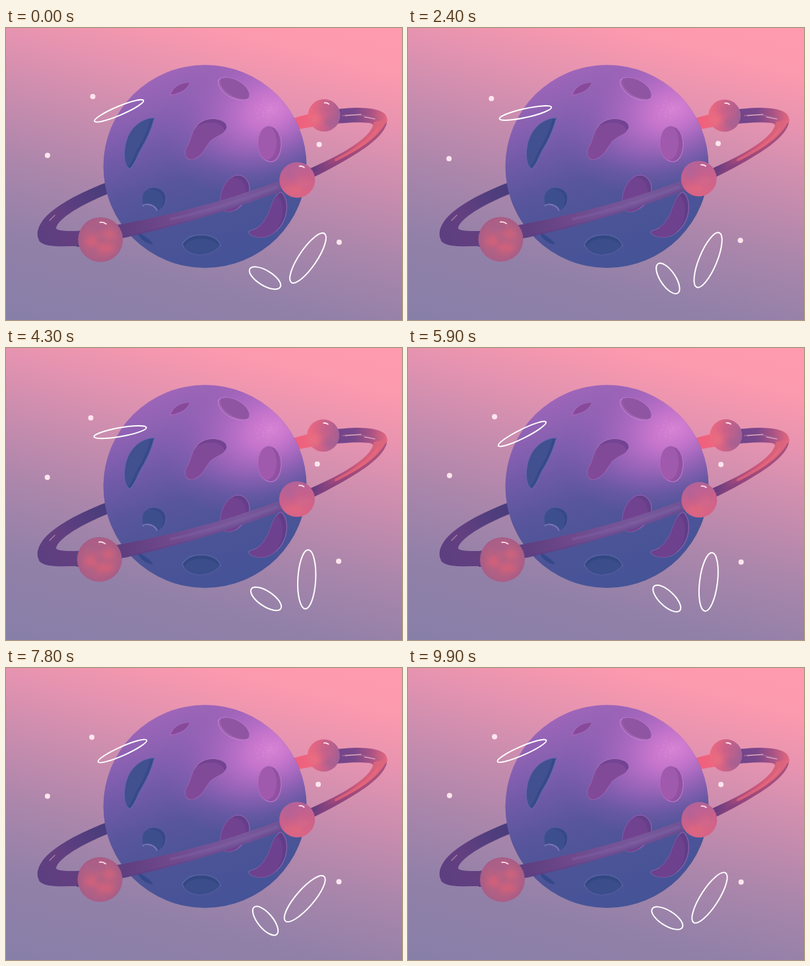
An HTML page that plays this animation: 600 by 443 pixels, repeating every 10 s.

```html
<!DOCTYPE html>
<html lang="en">
<head>
<meta charset="utf-8">
<title>Ringed planet</title>
<style>
  html, body { margin: 0; width: 100%; height: 100%; overflow: hidden; background: #a886ab; }
  svg { display: block; width: 600px; height: 443px; }
</style>
</head>
<body>
<svg viewBox="0 0 600 443" xmlns="http://www.w3.org/2000/svg">
  <defs>
    <linearGradient id="sky" gradientUnits="userSpaceOnUse" x1="600" y1="20" x2="460" y2="563">
      <stop offset="0" stop-color="#ff9bae"/><stop offset=".1" stop-color="#fb99ae"/>
      <stop offset=".25" stop-color="#e493b0"/><stop offset=".42" stop-color="#c68cae"/>
      <stop offset=".58" stop-color="#ab86ab"/><stop offset=".78" stop-color="#9180a8"/>
      <stop offset="1" stop-color="#877fa8"/>
    </linearGradient>
    <linearGradient id="globe" gradientUnits="userSpaceOnUse" x1="245" y1="60" x2="345" y2="355">
      <stop offset="0" stop-color="#a066ba"/><stop offset=".18" stop-color="#8b61b2"/>
      <stop offset=".36" stop-color="#705aa8"/><stop offset=".54" stop-color="#58559d"/>
      <stop offset=".74" stop-color="#4c5497"/><stop offset="1" stop-color="#455397"/>
    </linearGradient>
    <radialGradient id="glow">
      <stop offset="0" stop-color="#d683d4"/><stop offset=".22" stop-color="#d078d0" stop-opacity=".88"/>
      <stop offset=".5" stop-color="#c46ecb" stop-opacity=".55"/>
      <stop offset=".78" stop-color="#b866c4" stop-opacity=".18"/>
      <stop offset="1" stop-color="#b062c0" stop-opacity="0"/>
    </radialGradient>
    <linearGradient id="backLeft" gradientUnits="userSpaceOnUse" x1="48" y1="320" x2="155" y2="240">
      <stop offset="0" stop-color="#5a3f80"/><stop offset=".35" stop-color="#643f80"/>
      <stop offset=".7" stop-color="#533e7e"/><stop offset="1" stop-color="#483c7c"/>
    </linearGradient>
    <linearGradient id="backRight" gradientUnits="userSpaceOnUse" x1="437" y1="0" x2="578" y2="0">
      <stop offset="0" stop-color="#ee5f7e"/><stop offset=".2" stop-color="#f0667e"/>
      <stop offset=".45" stop-color="#70448b"/><stop offset=".64" stop-color="#784789"/>
      <stop offset=".82" stop-color="#a85285"/><stop offset="1" stop-color="#e4697f"/>
    </linearGradient>
    <linearGradient id="front" gradientUnits="userSpaceOnUse" x1="48" y1="0" x2="578" y2="0">
      <stop offset="0" stop-color="#5a4283"/><stop offset=".08" stop-color="#65407e"/>
      <stop offset=".25" stop-color="#5f3f81"/><stop offset=".36" stop-color="#6d4789"/>
      <stop offset=".47" stop-color="#735296"/><stop offset=".58" stop-color="#78579b"/>
      <stop offset=".69" stop-color="#705396"/><stop offset=".79" stop-color="#673c80"/>
      <stop offset=".85" stop-color="#a34a7b"/><stop offset=".92" stop-color="#d25b79"/>
      <stop offset="1" stop-color="#de687f"/>
    </linearGradient>
    <radialGradient id="coral">
      <stop offset="0" stop-color="#bf6280"/><stop offset=".7" stop-color="#b56083"/>
      <stop offset="1" stop-color="#a75d87"/>
    </radialGradient>
    <linearGradient id="rose" x1=".3" y1="0" x2=".55" y2="1">
      <stop offset="0" stop-color="#b2629a"/><stop offset=".5" stop-color="#c9618b"/>
      <stop offset="1" stop-color="#da6485"/>
    </linearGradient>
    <linearGradient id="plum" x1="0" y1=".55" x2="1" y2=".65">
      <stop offset="0" stop-color="#ec6980"/><stop offset=".45" stop-color="#d06287"/>
      <stop offset="1" stop-color="#a05f96"/>
    </linearGradient>
    <filter id="soft" x="-60%" y="-60%" width="220%" height="220%"><feGaussianBlur stdDeviation="3"/></filter>
    <clipPath id="disc"><circle cx="301.5" cy="210" r="154"/></clipPath>
    <clipPath id="band"><path d="M107 308C150 303 240 288 350 254C420 231 500 201 538 170C549 161 556 153 557 143L578 138C577 156 559 173 530 191C490 216 450 235 414 249C300 290 230 307 175 319C145 327 122 333 107 332Z"/></clipPath>
  </defs>

  <rect width="600" height="443" fill="url(#sky)"/>

  <!-- far side of the ring -->
  <path fill="url(#backLeft)" d="M156 233C118 247 77 267 58 289C47 302 45 315 51 324C60 333 84 331 108 331L108 308C92 308 78 308 76 304C77 292 106 271 156 251Z"/>
  <path fill="url(#backRight)" d="M432 138C463 128 497 122 530 121C556 121 575 125 577 136C578 147 573 155 567 161L547 162C556 153 561 146 550 144C533 142 500 143 440 154Z"/>
  <g fill="none" stroke-linecap="round">
    <path d="M66 292L74 284M46 317L49 321" stroke="#b17fa6" stroke-width="1.2"/>
    <path d="M510 133C530 130 546 133 558 137" stroke="#9c5f91" stroke-width="2"/>
    <path d="M514 133L538 131M543 135L559 138" stroke="#eec0cf" stroke-width="1.2"/>
  </g>

  <g clip-path="url(#disc)">
    <rect x="147" y="55" width="310" height="310" fill="url(#globe)"/>
    <ellipse rx="175" ry="118" fill="url(#glow)" transform="translate(402 124) rotate(-24)"/>
    <g id="craters"></g>
    <path fill="#34488a" d="M203 311C210 316 219 321 223 328C213 328 204 320 200 313Z"/>
    <g fill="#ecadde" opacity=".65" id="glints"></g>
  </g>

  <!-- near side of the ring -->
  <g clip-path="url(#band)">
    <rect x="45" y="100" width="540" height="240" fill="url(#front)"/>
    <g fill="none" stroke-linecap="round">
      <path d="M100 331C210 318 310 286 416 247" stroke="#503b82" stroke-width="6" opacity=".25"/>
      <path d="M250 290C305 278 350 263 410 241" stroke="#8263a6" stroke-width="4" opacity=".4"/>
      <path d="M468 222C518 197 560 178 577 147" stroke="#7c4180" stroke-width="6" opacity=".55"/>
      <path d="M500 200C530 185 553 170 563 153" stroke="#ee6a7d" stroke-width="4" opacity=".6"/>
    </g>
  </g>

  <g id="balls"></g>
  <g id="dots" fill="#fde5ed"></g>
  <g id="loops" fill="none" stroke="#fff" stroke-width="2"></g>
</svg>

<script>
const LOOP = 10000, SWAY = 2000, STEP = 100;
const $ = id => document.getElementById(id);

// outline, floor colour, rim colour, edge colour, floor offset
const craters = [
  ['M248 102C251 91 263 83 278 83C274 94 262 100 248 102Z', '#874999', '#9858ab', '#a866bb', 2, -1],
  ['M323 78C333 71 353 78 363 89C370 97 371 107 363 109C350 111 334 104 326 93C322 87 320 81 323 78Z', '#8f55a3', '#9c5fae', '#c07fd0', 3, -2],
  ['M225 136C206 138 191 149 184 168C179 182 177 204 187 214C194 210 198 196 204 185C214 169 220 155 225 136Z', '#41508f', '#38498a', '#6068af', -5, -1],
  ['M298 141C312 134 334 138 335 150C334 160 318 163 309 172C302 181 298 195 283 199C272 201 269 190 274 181C282 170 282 148 298 141Z', '#814a98', '#734391', '#a76dbc', -4, 6],
  ['M397 149C411 148 417 163 417 178C416 193 410 203 401 203C389 202 382 190 382 176C382 161 387 151 397 149Z', '#a05aad', '#9151a3', '#bd76c8', -7, -3],
  ['M217 243C229 239 242 246 242 258C242 269 236 276 229 277C225 269 217 267 210 271C204 264 205 248 217 243Z', '#3d4e8d', '#374788', '#555ba2', -4, 3],
  ['M352 223C364 224 370 235 369 248C366 264 350 279 335 279C325 276 324 263 326 252C330 236 341 223 352 223Z', '#71428f', '#653f8a', '#9563b1', -6, 4],
  ['M417 249C425 255 428 272 423 287C416 308 397 320 382 317C372 316 366 311 369 308C382 305 390 297 397 283C403 269 407 251 417 249Z', '#6d418d', '#603e87', '#8b61ad', -6, 5],
  ['M267 328C274 316 286 313 300 314C314 315 323 322 325 330C316 339 306 344 293 344C281 343 271 338 267 328Z', '#3b4d8b', '#334883', '#6268ab', 1, 6]
];
$('craters').innerHTML = craters.map(([d, floor, rim, edge, dx, dy], i) =>
  `<clipPath id="c${i}"><path d="${d}"/></clipPath>
   <path d="${d}" fill="${rim}" stroke="${edge}" stroke-width="1.2"/>
   <g clip-path="url(#c${i})"><path d="${d}" fill="${floor}" transform="translate(${dx} ${dy})"/></g>`).join('') +
  '<path d="M207 270C213 265 225 268 229 277" fill="none" stroke="#7c76b5" stroke-width="2"/>';

for (let i = 0; i < 16; i++) {
  const a = i * 2.4, r = 4 + i * 1.1;
  $('glints').innerHTML += `<circle cx="${393 + r * Math.cos(a)}" cy="${125 + r * .75 * Math.sin(a)}" r=".65"/>`;
}

const shine = (r, x) =>
  `<path d="M${x - r * .14} ${-r * .77}Q${x} ${-r * .8} ${x + r * .13} ${-r * .7}" fill="none" stroke="#ffe6ea" stroke-width="1.8" stroke-linecap="round"/>`;

function ball(r, paint, blots, x) {
  const id = 'b' + r;
  return `<g><clipPath id="${id}"><circle r="${r}"/></clipPath><circle r="${r}" fill="url(#${paint})"/>
    <g clip-path="url(#${id})"><g filter="url(#soft)">${blots.map(([bx, by, rx, ry, c]) =>
      `<ellipse cx="${bx}" cy="${by}" rx="${rx}" ry="${ry}" fill="${c}" opacity=".6"/>`).join('')}</g></g>
    ${shine(r, x)}</g>`;
}
$('balls').innerHTML =
  ball(24.5, 'plum', [[5, -10, 11, 5, '#bb618c'], [10, 11, 9, 7, '#a35f93'], [-13, 6, 8, 9, '#f0707f']], 4) +
  ball(27, 'rose', [[-12, -9, 8, 9, '#b0629a'], [9, 4, 11, 6, '#d4698b'], [-5, 15, 14, 7, '#e2687f']], 7) +
  ball(34, 'coral', [[-13, 3, 10, 7, '#e05f76'], [8, 13, 13, 7, '#dc5f76'], [14, -8, 9, 7, '#d6627a'],
    [-6, -19, 15, 7, '#a35f8c'], [-14, 20, 9, 6, '#aa6088'], [0, 0, 7, 6, '#a86089']], 4);

// x, y, then linear and quadratic travel on each axis
const ballPaths = [
  [482, 132.5, -6.8, 0, 1.4, 0],
  [441.3, 230.5, -2, .4, -5.9, 0],
  [143.2, 321, -7.5, 0, -1.6, 0]
];
const dotPaths = [
  [131.5, 104, -14.8, 0, 10, -3.3],
  [62.9, 193.2, 0, -6.3, 14.5, 0],
  [474.5, 176.8, -15, 5, -4, -2.1],
  [504.8, 325, -4, 2, -7.6, 0]
];
$('dots').innerHTML = '<circle r="4"/>'.repeat(dotPaths.length);

// drifting loops: radii, then x, y and angle at each time
const times = [0, 2400, 4300, 5900, 6900, 8700, 9900];
const loops = [
  { rx: 40.3, ry: 6.7,
    x: [171.2, 178, 173, 173, 172.7, 179, 172.5],
    y: [125.7, 129, 127.7, 130.3, 127.8, 124.7, 125.8],
    a: [-23, -12.5, -10, -26.5, -30.5, -18, -23.5] },
  { rx: 26.8, ry: 11.4,
    x: [392.5, 393.8, 394, 392.2, 392.5, 393.4, 392.8],
    y: [379.3, 380, 380.5, 380, 380.8, 385.2, 379.5],
    a: [31, 56, 34, 43.5, 42.5, 55, 32] },
  { rx: 44.7, ry: 13.5,
    x: [457.5, 454.6, 455.7, 455.4, 452.3, 454, 457],
    y: [349, 352, 351, 354.8, 354.4, 346.3, 348.5],
    a: [-56, -67.5, -87, -83, -49, -55, -57.3] }
];
$('loops').innerHTML = loops.map(l => `<ellipse rx="${l.rx}" ry="${l.ry}"/>`).join('');

// smooth periodic curve through the keyed values
function curve(vals, t) {
  const n = times.length;
  const at = i => times[(i + n) % n] + Math.floor(i / n) * LOOP;
  const val = i => vals[(i + n) % n];
  let i = n - 1;
  while (times[i] > t) i--;
  const slope = k => (val(k + 1) - val(k - 1)) / (at(k + 1) - at(k - 1));
  const h = at(i + 1) - at(i), s = (t - at(i)) / h, s2 = s * s, s3 = s2 * s;
  return (2 * s3 - 3 * s2 + 1) * val(i) + (s3 - 2 * s2 + s) * h * slope(i) +
    (3 * s2 - 2 * s3) * val(i + 1) + (s3 - s2) * h * slope(i + 1);
}

function place(group, paths, u) {
  paths.forEach(([x, y, ax, bx, ay, by], i) =>
    group.children[i].setAttribute('transform',
      `translate(${x + ax * u + bx * u * u} ${y + ay * u + by * u * u})`));
}

function draw() {
  const t = Math.floor(performance.now() % LOOP / STEP) * STEP;
  const u = (1 - Math.cos(2 * Math.PI * t / SWAY)) / 2;
  place($('balls'), ballPaths, u);
  place($('dots'), dotPaths, u);
  loops.forEach((l, i) => $('loops').children[i].setAttribute('transform',
    `translate(${curve(l.x, t)} ${curve(l.y, t)}) rotate(${curve(l.a, t)})`));
  requestAnimationFrame(draw);
}
draw();
</script>
</body>
</html>
```
